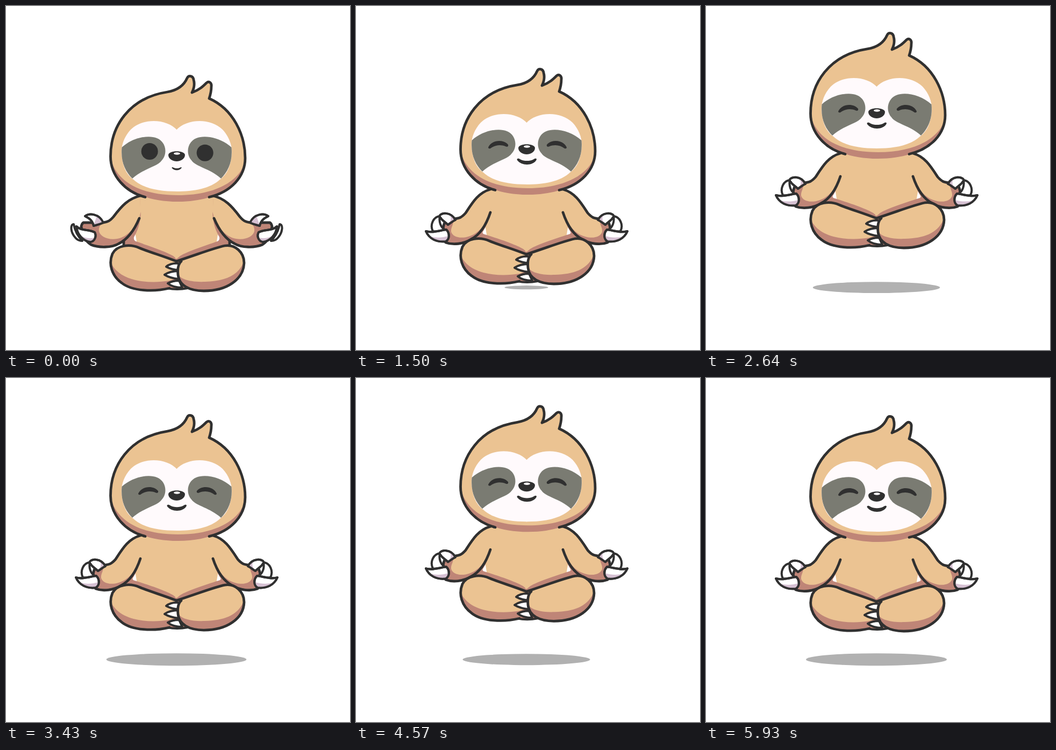
Write an HTML page that moves like this. It is 640 px wide and 640 px high and loops after 6 s.

```html
<!DOCTYPE html>
<html lang="en">
<head>
<meta charset="utf-8">
<title>Meditating sloth</title>
<style>
  html, body { margin: 0; height: 100%; overflow: hidden; background: #fff; }
  svg { display: block; width: 100vw; height: 100vh; }
  .fur { fill: #ebc392; }
  .shade { fill: #bf8577; }
  .ink { fill: #303030; }
  .white { fill: #fffafc; }
  .lilac { fill: #d6c1d3; }
  .patch { fill: #7a7b72; }
  .line { fill: none; }
  .line, .claw { stroke: #303030; stroke-width: 4.8; stroke-linecap: round; stroke-linejoin: round; }
  .claw { fill: #fff; }
  .claw, .thin { stroke-width: 4; }
</style>
</head>
<body>
<svg viewBox="0 0 640 640">
  <ellipse id="shadow" cx="317" cy="523.7" fill="#b1b1b1"/>
  <g id="sloth">
    <!-- torso -->
    <g id="torso">
      <path class="fur" d="M320 340H245L240 420L245 450L320 480Z"/>
      <path class="shade" data-part="torsoShade"/>
      <path class="line" d="M219 429V446"/>
    </g>
    <use href="#torso" transform="matrix(-1 0 0 1 635 0)"/>

    <!-- arms -->
    <g id="arm">
      <path class="shade" data-part="arm"/>
      <path class="fur" data-part="armFur"/>
      <path class="line" data-part="arm"/>
      <path class="claw" data-part="backClaw"/>
      <path class="claw" data-part="frontClaw"/>
      <path class="lilac" data-part="frontTint"/>
      <path class="line thin" data-part="frontClaw"/>
      <path class="claw" data-part="thumb"/>
      <path class="lilac" data-part="thumbTint"/>
      <path class="line thin" data-part="thumb"/>
    </g>
    <use href="#arm" transform="matrix(-1 0 0 1 635 0)"/>

    <!-- legs -->
    <path class="claw" style="fill:#bf8577" d="M300 525Q318 529 338 525L330 500H305Z"/>
    <path class="shade" d="M317 475C292 465 267 458 248 450C230 442 206 445 198 461C190 480 197 502 215 515C235 531 275 532 304 525L322 518Z"/>
    <path class="fur" d="M317 475C292 465 267 458 248 450C230 442 206 445 198 461C195 469 195 474 197 481C213 511 262 518 304 511L322 505Z"/>
    <path class="line" d="M317 475C292 465 267 458 248 450C230 442 206 445 198 461C190 480 197 502 215 515C235 531 275 532 304 525"/>
    <path class="claw" d="M322 479C312 478 304 480 298 485C305 489 312 491 322 491Z"/>
    <path class="claw" d="M322 493C311 493 302 495 295 500C303 505 311 507 322 508Z"/>
    <path class="claw" d="M322 511C314 511 306 513 301 516C307 521 316 524 328 524Z"/>
    <path class="shade" d="M326 475C320 480 319 490 320 500C322 520 341 530 368 530C412 530 442 508 443 478C443 458 426 443 407 446C388 450 372 461 326 472Z"/>
    <path class="fur" d="M326 475C320 480 319 490 321 501C328 510 348 514 370 513C405 512 430 503 441 479C443 458 426 443 407 446C388 450 372 461 326 472Z"/>
    <path class="line" d="M326 475C320 480 319 490 320 500C322 520 341 530 368 530C412 530 442 508 443 478C443 458 426 443 407 446C388 450 368 458 317 475"/>

    <!-- head -->
    <path class="shade" d="M194 280C194 320 232 364 320 364C405 364 445 322 445 283Z"/>
    <path class="fur" d="M194 280C194 224 229 171 300 160C318 157 331 148 337 134C340 128 348 130 349 137C352 147 349 155 346 161C360 156 367 149 373 143C378 139 383 143 382 150C382 160 380 166 378 172C423 192 445 240 445 283C443 316 402 352 320 352C238 352 201 318 194 280Z"/>
    <path class="line" d="M259 355.500C222 346 194.500 316 194.500 280C194.500 224 229 171 300 160C318 157 331 148 337 134C340 128 348 130 349 137C352 147 349 155 346 161C360 156 367 149 373 143C378 139 383 143 382 150C382 160 380 166 378 172C423 192 445 240 445 283C445 318 418 346 378 355.500"/>

    <!-- face -->
    <g id="mask">
      <path class="white" d="M318.500 231C300 210 255 207 232 230C219 244 214 261 215 275C217 300 225 314 236 322C255 340 285 345 318.500 345Z"/>
      <path class="patch" d="M215.500 263C235 245 265 239 281 246C298 253 301 275 290 287C282 299 256 302 235 321C222 308 213 290 215.500 263Z"/>
    </g>
    <use href="#mask" transform="matrix(-1 0 0 1 635 0)"/>
    <path class="ink" d="M302 277C303 268 332 268 333 277C333 285 324 289 317.500 289C311 289 302 285 302 277Z"/>
    <ellipse class="white" cx="318" cy="274.500" rx="6" ry="2.200"/>
    <ellipse class="ink eye" cx="267.200" cy="270.500" rx="15.500"/>
    <ellipse class="ink eye" cx="370.200" cy="273.300" rx="15.500"/>
    <g id="closedEyes">
      <path id="lid" class="ink" d="M246 276C252 262 274 260 283 271C284 275 281 275 279 274.500C268 270 258 272 250 278Q246 279 246 276Z"/>
      <use href="#lid" transform="matrix(-1 0 0 1 638 0)"/>
    </g>
    <path id="mouth" class="ink" d="M300 300C298 296 303 296 306 298.500C313 302 323 302 330 298.500C333 296 338 296 335 300.500C328 310.500 308 310.500 300 300Z"/>
  </g>
</svg>
<script>
// Each part: resting pose, then floating pose.
const poses = {
  torsoShade: [
    "M251 383C250 405 244 420 238 430Q237 436 242 438C265 446 298 457 311 465L317 470L320 470L320 480L219 448L218 430C232 418 245 405 251 383Z",
    "M250 397C247 412 242 424 236 433Q234 437 240 438C265 446 298 457 311 465L317 470L320 470L320 480L219 448L218 440C232 430 243 415 250 397Z"],
  arm: [
    "M248 395C240 414 228 433 210 442C197 450 172 450 158 444C148 438 142 425 140 410C141 406 142 404 144 403C155 403 168 403 180 403C190 402 194 399 200 392C215 372 228 358 250 353",
    "M250 397C243 418 232 438 214 447C200 456 180 458 167 453C162 448 160 440 162 430C162 424 163 420 165 416C172 414 178 410 183 409C192 408 196 407 204 398C217 378 228 360 250 354"],
  armFur: [
    "M250 353L249 393C240 412 226 430 207 433C190 436 175 429 173 419C172 411 176 405 183 403C192 401 196 397 200 392C215 372 228 358 250 353Z",
    "M250 354L250 396C242 416 232 434 212 441C195 447 180 443 177 433C176 425 182 420 181 411C192 408 196 407 204 398C217 378 228 360 250 354Z"],
  backClaw: [
    "M126 406C119 406 120 421 129 431C133 436 138 437 142 437C134 429 128 418 126 406Z",
    "M156 404C144 405 137 420 143 432C150 434 158 434 165 429C157 424 154 414 156 404Z"],
  frontClaw: [
    "M131 410C140 419 155 415 165 421C169 428 165 438 157 439C143 437 132 425 131 410Z",
    "M130 432C142 436 158 430 168 429C175 436 174 447 167 451C150 453 136 446 130 432Z"],
  frontTint: [
    "M133 420C140 430 150 434 165 431C163 437 161 439 157 439C143 437 135 428 133 420Z",
    "M136 441C148 445 160 444 172 441C172 447 171 449 167 451C150 453 141 447 136 441Z"],
  thumb: [
    "M147 391C155 385 173 386 181 403C175 406 169 407 163 409C161 398 153 394 147 391Z",
    "M155 404C158 397 176 395 185 411C180 413 176 417 171 420C167 415 161 414 155 404Z"],
  thumbTint: [
    "M169 390C176 393 179 398 181 403C175 406 169 407 163 409C164 402 168 396 169 390Z",
    "M174 402C179 404 182 407 185 411C180 413 176 417 171 420C174 414 180 410 174 402Z"]
};

const $ = id => document.getElementById(id);
const parts = [...document.querySelectorAll("[data-part]")];
const eyes = document.querySelectorAll(".eye");

const progress = (t, from, to) => Math.min(1, Math.max(0, (t - from) / (to - from)));
const ease = (t, from, to) => (1 - Math.cos(Math.PI * progress(t, from, to))) / 2;
const blink = (t, from, to) => Math.sin(Math.PI * progress(t, from, to)) ** 2;

function morph([a, b], k) {
  const target = b.match(/[\d.]+/g);
  let i = 0;
  return a.replace(/[\d.]+/g, n => (+n + (target[i++] - n) * k).toFixed(2));
}

function draw(t) {
  const rise = ease(t, 1149, 2490);
  const sink = ease(t, 2490, 3580);
  const riseAgain = ease(t, 3580, 4770);
  const sinkAgain = ease(t, 4770, 5930);
  const y = -81 * rise + 21 * sink - 19 * riseAgain + 20 * sinkAgain;
  $("sloth").setAttribute("transform", `translate(0 ${y})`);

  const rx = 117.7 * ease(t, 826, 2512) + 13.3 * (sink - riseAgain + sinkAgain);
  $("shadow").setAttribute("rx", rx);
  $("shadow").setAttribute("ry", rx * 0.088);

  const pose = ease(t, 900, 1480);
  for (const part of parts) part.setAttribute("d", morph(poses[part.dataset.part], pose));

  const smile = 0.5 + 0.5 * pose;
  $("mouth").setAttribute("transform", `translate(317.5 303) scale(${smile}) translate(-317.5 -303)`);

  const asleep = t >= 1100;
  const open = 1 - 0.9 * Math.max(blink(t, 0, 285), blink(t, 435, 780), ease(t, 880, 1100));
  for (const eye of eyes) eye.setAttribute("ry", asleep ? 0 : 15.5 * open);
  $("closedEyes").setAttribute("visibility", asleep ? "visible" : "hidden");
}

const start = performance.now();
function tick() {
  draw((performance.now() - start) % 6000);
  requestAnimationFrame(tick);
}
tick();
</script>
</body>
</html>
```
